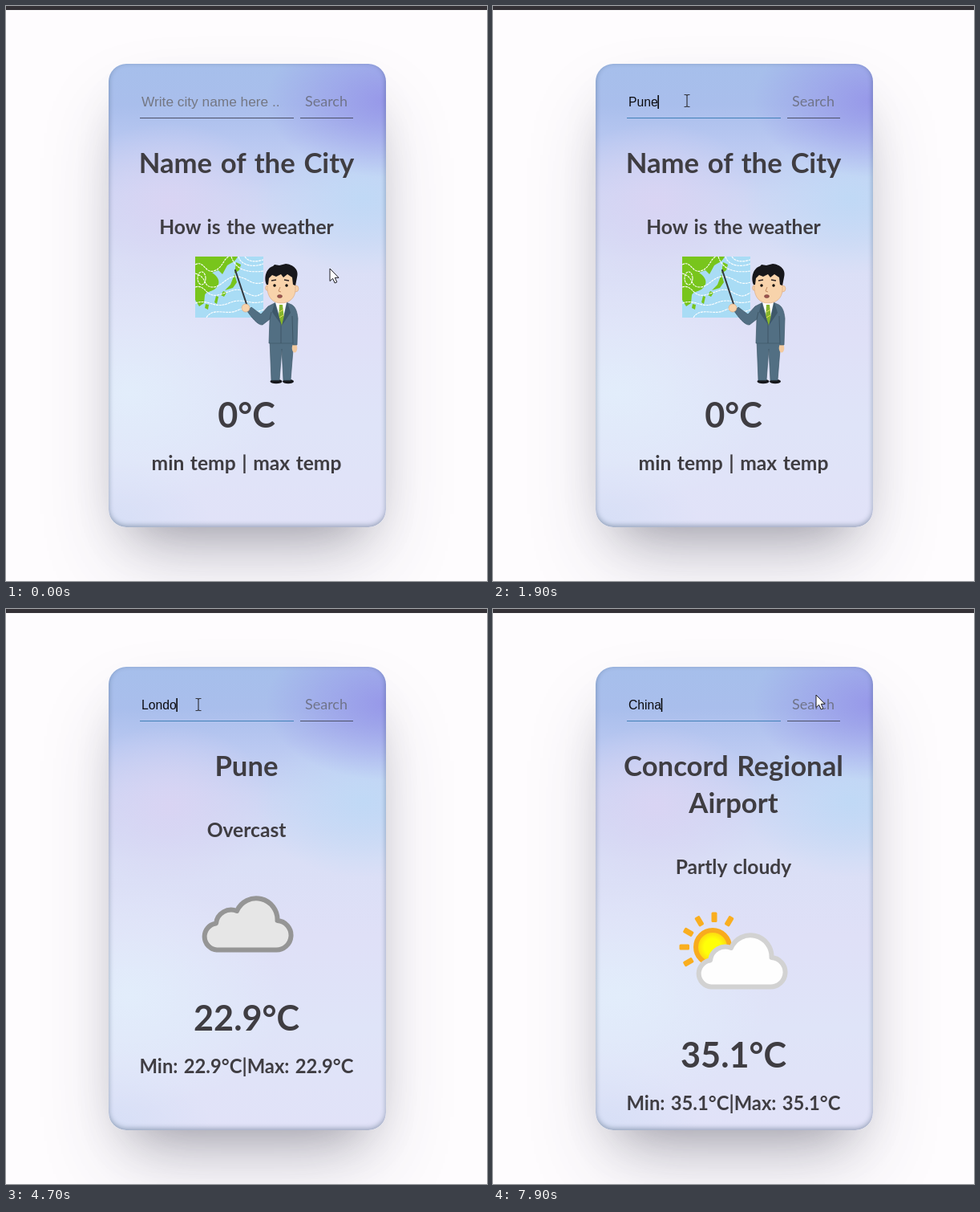
Animation of 600x716 px, one loop 8 s. Source, as an HTML page:

```html
<!DOCTYPE html>
<html lang="en">
<head>
<meta charset="utf-8">
<title>Weather card</title>
<style>
html, body { margin: 0; width: 100%; height: 100%; overflow: hidden; background: #fefcfe; }
#bar { position: absolute; top: 0; left: 0; width: 600px; height: 5px; background: #343136; }
#card {
  position: absolute; left: 127.5px; top: 71.5px; width: 346px; height: 577px; border-radius: 22px;
  background:
    radial-gradient(ellipse 150px 95px at 100% 8%, #9798e9, #9798e900),
    radial-gradient(ellipse 135px 95px at 92% 29%, #c0d9f6, #c0d9f600),
    radial-gradient(ellipse 130px 100px at 22% 30%, #d9d4f3, #d9d4f300),
    radial-gradient(ellipse 190px 140px at 8% 71%, #e2edfb, #e2edfb00),
    radial-gradient(ellipse 130px 90px at 0 100%, #d6dff6, #d6dff600),
    linear-gradient(#a6bfeb, #a9beec 9%, #b9c8f1 17%, #cdd6f4 28%, #dadff6 42%, #dfe0f7 58%, #dfe4f8 78%, #e1e2f8);
  box-shadow: 0 50px 100px -20px rgba(50,50,93,.25), 0 30px 60px -30px rgba(0,0,0,.3),
    inset 0 -2px 6px rgba(10,37,64,.35);
}
svg { position: absolute; left: 0; top: 0; }
.mid { text-anchor: middle; fill: #3f3d42; word-spacing: .065em; }
.title { font: 700 34.7px Lato, sans-serif; }
.sub { font: 700 24.6px Lato, sans-serif; }
.range { font: 700 23.8px Lato, sans-serif; }
.temp { font: 700 43.2px Lato, sans-serif; }
.hint { font: 17.3px "Liberation Sans", Arial, sans-serif; fill: #747783; }
.typed { font: 15.7px "Liberation Sans", Arial, sans-serif; fill: #0c0c10; }
.button { font: 18px Lato, sans-serif; fill: #70748a; text-anchor: middle; }
.says { font: 600 16px "Open Sans", sans-serif; fill: #eeecef; }
.note { font: 14px "Open Sans", sans-serif; fill: #e2dfe3; }
.ok { font: 600 14px "Open Sans", sans-serif; fill: #1d3a6b; text-anchor: middle; }
.soft { filter: blur(.7px); }
</style>
</head>
<body>
<div id="bar"></div>
<div id="card"></div>
<svg width="600" height="716" viewBox="0 0 600 716">
  <defs>
    <clipPath id="mapClip"><path d="M236 312h85v76h-85z"/></clipPath>
    <radialGradient id="sunFill">
      <stop offset=".5" stop-color="#ffff08"/><stop offset="1" stop-color="#fbce13"/>
    </radialGradient>
    <path id="cloud" stroke-width="6" stroke-linejoin="round"
      d="M263 424.500H336A18 18 0 0 0 338.500 388A26.400 26.400 0 0 0 288 376A19 19 0 0 0 262 391.500A16.600 16.600 0 0 0 263 424.500Z"/>
  </defs>

  <text id="hint" class="hint" x="169" y="125">Write city name here ..</text>
  <text id="typed" class="typed" x="169" y="125"></text>
  <path id="caret" stroke="#000" stroke-width="1.5" d="M0 111V128"/>
  <path id="line" stroke="#4c5068" d="M167 139.5H359"/>
  <path stroke="#4c5068" d="M367 139.5H433"/>
  <text class="button" x="399.5" y="125">Search</text>

  <text id="city" class="title mid" x="300" y="208"></text>
  <text id="city2" class="title mid" x="300" y="254"></text>
  <g id="body">
    <text id="sky" class="sub mid" x="300" y="284"></text>
    <text id="temp" class="temp mid" x="300" y="525"></text>
    <text id="range" class="mid" x="300" y="578"></text>

    <g id="presenter">
      <g clip-path="url(#mapClip)">
        <path fill="#a9dcf5" d="M236 312h85v76h-85z"/>
        <path fill="#78c51c" d="M236 312H289C286 319 280 320 276 323L270 334 265 329 257 332C266 338 268 345 262 351
          C258 356 250 355 248 360L247 370 241 374 236 366Z"/>
        <path fill="#78c51c" d="M287 319l6 3-2 7-6 4zM285 334l3 10-5 7-10 3 7-7zM271 355l4 2-3 5-4-2zM262 361l3 1-2 9-3-2zM249 371l4 1-1 6-4-2z"/>
        <g fill="none" stroke="#fff" stroke-width="1.1" stroke-dasharray="3 .8">
          <path d="M236 322C247 316 248 333 259 330S271 315 278 312M236 333C252 338 245 349 257 350S275 335 289 337 307 349 321 344"/>
          <path d="M236 350C249 346 249 363 264 360S286 349 298 356 313 362 321 357M236 370C253 364 259 378 278 370S301 373 321 368"/>
          <path d="M250 388C259 374 275 386 289 379S309 385 321 378M281 312C286 328 301 333 321 330"/>
          <path d="M290 312C293 323 308 326 321 321M298 312C302 319 312 319 321 316"/>
          <ellipse cx="244" cy="339" rx="5" ry="8"/>
        </g>
      </g>
      <path stroke="#33363c" stroke-width="2" stroke-linecap="round" d="M286 329L301 374"/>
      <g fill="#17181c"><ellipse cx="337" cy="467.5" rx="7.5" ry="2.8"/><ellipse cx="352" cy="467.5" rx="7" ry="2.8"/></g>
      <path fill="#526f83" stroke="#405969" stroke-width=".7" d="M329 416H359L355 466H346L344 427 341 466H331Z"/>
      <ellipse cx="360" cy="426" rx="3.3" ry="5.5" fill="#f3ca9f"/>
      <path fill="#526f83" stroke="#405969" stroke-width=".7"
        d="M333 371C338 368 349 368 354 371 361 373 363 380 364 389L363 422H358L358 420H328L329 390 320 397
          C314 398 305 386 301 380L306 375 318 384 327 374Z"/>
      <path fill="none" stroke="#3e5666" d="M357 386L358 420M343 396V420M329 390L331 381"/>
      <path fill="#fff" d="M336 369H350L344 397Z"/>
      <path fill="#86b52c" d="M341 372h4l2 18-3 8-4-8z"/>
      <path stroke="#e5de58" d="M341 381l5-3M341 388l5-3"/>
      <path fill="#3e586a" d="M335 369L344 398 332 381ZM351 369L344 398 355 382Z"/>
      <g fill="#f8d3ab" stroke="#dba77c" stroke-width=".6">
        <circle cx="299" cy="376" r="5"/>
        <circle cx="327" cy="351" r="3.5"/><circle cx="361" cy="352" r="4"/>
        <path d="M326 339C326 326 361 326 361 340V353C361 364 353 370 343 370S327 363 326 353Z"/>
      </g>
      <path fill="#17171b" d="M325 347C321 338 325 326 333 324L335 322 341 323 349 321C358 322 366 328 363 338
        L361 348 358 347 357 338 351 334 346 338 343 334 337 337 332 335 328 339 327 347Z"/>
      <path fill="none" stroke="#2d2323" stroke-width="1.3" d="M331 342l6-1M347 341l6 1"/>
      <circle cx="335" cy="348" r="1.7"/><circle cx="350" cy="348" r="1.7"/>
      <path fill="none" stroke="#c58d63" d="M342 350l-2 5 3 1"/>
      <ellipse cx="341.500" cy="361.500" rx="3" ry="1.900" fill="#a05550" stroke="#714039" stroke-width=".6"/>
    </g>

    <use id="overcast" class="soft" href="#cloud" fill="#e6e6e6" stroke="#959595"/>

    <g id="partly" class="soft">
      <g id="rays" fill="#f9ae1f"></g>
      <circle cx="274" cy="375" r="21" fill="url(#sunFill)" stroke="#f8ab1e" stroke-width="6"/>
      <use href="#cloud" x="9" fill="#fefefe" stroke="#d2d2d2"/>
    </g>
  </g>

  <g id="dialog">
    <path fill="#5d5961" d="M39 0H560V121a10 10 0 0 1-10 10H49a10 10 0 0 1-10-10Z" opacity=".45"/>
    <path fill="#1f1d20" d="M41 0H559V120a9 9 0 0 1-9 9H50a9 9 0 0 1-9-9Z"/>
    <text class="says" x="64" y="5">127.0.0.1:5500 says</text>
    <text class="note" x="64" y="39">City not found</text>
    <rect x="458" y="59.500" width="81" height="51" rx="25.500" fill="none" stroke="#a9c3f3" stroke-width="2.500"/>
    <rect x="461.500" y="63" width="74" height="44" rx="22" fill="#a9c3f3"/>
    <text class="ok" x="498" y="90.500">OK</text>
  </g>

  <path id="arrow" fill="#fff" stroke="#1b1b22" stroke-linejoin="round" d="M0 0V15.500L3.600 12.300 6.200 18 8.800 16.800 6.300 11.300H11Z"/>
  <path id="beam" fill="none" stroke="#34363f" stroke-width="1.200" d="M-3.500-7.500H-1L0-6.500 1-7.500H3.500M0-6.500V6.500M-3.500 7.500H-1L0 6.500 1 7.500H3.500"/>
</svg>
<script>
const LOOP = 8000, STEP = 100;
const $ = id => document.getElementById(id);

const views = [
  { at: 0, city: "Name of the City", sky: "How is the weather", icon: "presenter", temp: "0" },
  { at: 2600, city: "Pune", sky: "Overcast", icon: "overcast", temp: "22.9" },
  { at: 5300, city: "London", sky: "Overcast", icon: "overcast", temp: "16.1" },
  { at: 6600, city: "Concord Regional", city2: "Airport", sky: "Partly cloudy", icon: "partly", temp: "35.1" }
];
const entries = [
  { word: "Pune", from: 1500, blur: 2500, to: 2600 },
  { word: "London", from: 4300, blur: 5200, to: 5300 },
  { word: "USA", from: 6000, blur: 6500, to: 6600 },
  { word: "China", from: 7200, blur: LOOP, to: LOOP }
];
const alertSpan = [600, 1200];

// time, x, y
const path = [
  [0, 404, 327], [400, 400, 120], [600, 398, 121], [700, 397, 122], [800, 400, 118],
  [1000, 500, 85], [1200, 500, 85], [1400, 242, 118], [2200, 242, 118],
  [2500, 408, 119], [3900, 408, 119], [4200, 240, 119], [4800, 240, 119],
  [5100, 405, 119], [5300, 405, 119], [5600, 215, 120], [6200, 215, 120],
  [6500, 409, 119], [6900, 409, 119], [7100, 235, 119], [7600, 235, 119],
  [7900, 403, 107]
];

$("rays").innerHTML = [-150, -120, -90, -60, 150, 180].map(a =>
  `<rect x="31" y="-3.5" width="12.5" height="7" rx="1.5" transform="translate(276 375) rotate(${a})"/>`).join("");

const show = (id, on) => $(id).style.display = on ? "" : "none";
const within = (t, a, b) => t >= a && t < b;

function pointer(t) {
  const i = path.findIndex(p => p[0] > t);
  if (i < 0) return path.at(-1).slice(1);
  const [a, b] = [path[i - 1], path[i]];
  const k = (t - a[0]) / (b[0] - a[0]), e = k * k * (3 - 2 * k);
  return [1, 2].map(n => a[n] + (b[n] - a[n]) * e);
}

function drawView(t) {
  const v = views.findLast(view => view.at <= t);
  const first = v === views[0];
  $("city").textContent = v.city;
  $("city2").textContent = v.city2 || "";
  $("sky").textContent = v.sky;
  $("temp").textContent = v.temp + "°C";
  $("range").textContent = first ? "min temp | max temp" : `Min: ${v.temp}°C|Max: ${v.temp}°C`;
  $("range").setAttribute("class", first ? "sub mid" : "range mid");
  $("body").setAttribute("transform", `translate(0 ${v.city2 ? 46 : 0})`);
  for (const id of ["presenter", "overcast", "partly"]) show(id, id === v.icon);
}

function drawInput(t) {
  const e = entries.find(entry => within(t, entry.from - STEP, entry.to));
  const text = e ? e.word.slice(0, Math.max(0, Math.floor((t - e.from) / STEP) + 1)) : "";
  const focus = e && t < e.blur;
  $("typed").textContent = text;
  show("hint", !text);
  show("caret", focus);
  $("line").setAttribute("stroke", focus ? "#4280b8" : "#4c5068");
  if (focus) {
    const x = 169.5 + (text ? $("typed").getComputedTextLength() : 0);
    $("caret").setAttribute("transform", `translate(${x} 0)`);
  }
}

function drawPointer(t, open) {
  const [x, y] = pointer(t);
  const inField = !open && within(x, 167, 359) && within(y, 103, 140);
  show("arrow", !inField);
  show("beam", inField);
  $(inField ? "beam" : "arrow").setAttribute("transform", `translate(${x} ${y})`);
}

function draw(t) {
  const open = within(t, ...alertSpan);
  drawView(t);
  drawInput(t);
  show("dialog", open);
  drawPointer(t, open);
}

const start = performance.now();
function tick() {
  const t = (performance.now() - start) % LOOP;
  draw(Math.floor(t / STEP) * STEP);
  requestAnimationFrame(tick);
}
tick();
</script>
</body>
</html>
```
